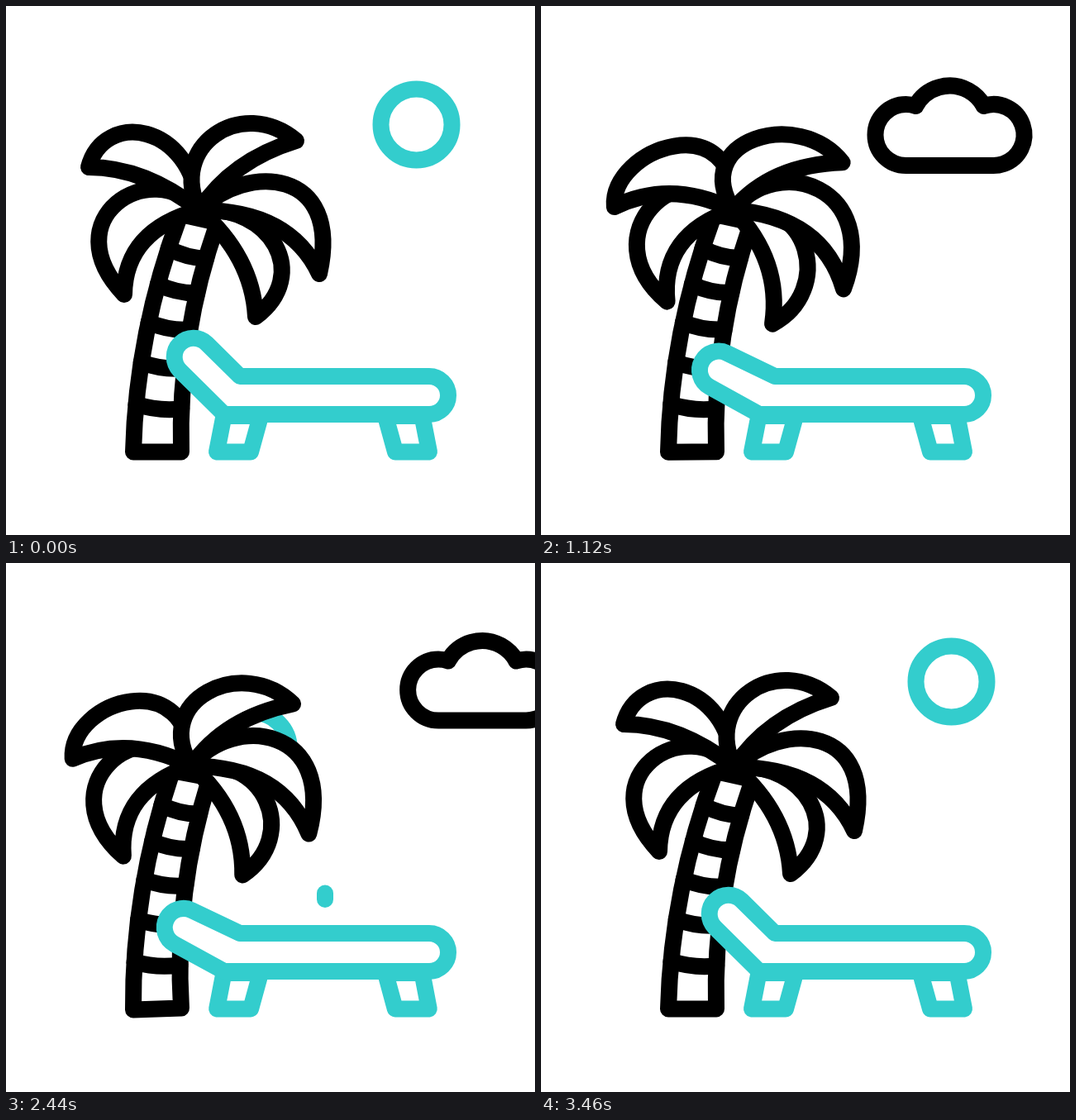
An HTML page with a canvas that plays this animation: 640 by 640 pixels, repeating every 3600 ms.

```html
<!DOCTYPE html>
<html lang="en">
<head>
<meta charset="utf-8">
<title>Beach</title>
<style>
html, body { margin: 0; width: 100%; height: 100%; overflow: hidden; background: #fff; }
canvas { display: block; }
</style>
</head>
<body>
<canvas id="stage" width="640" height="640"></canvas>
<script>
const ctx = document.getElementById('stage').getContext('2d');
const LOOP = 3600, INK = '#000', TEAL = '#33cdcd', DEG = Math.PI / 180;

const mix = (a, b, k) => a + (b - a) * k;
const smooth = k => k * k * (3 - 2 * k);
const ease = (t, from, to) => smooth(Math.min(1, Math.max(0, (t - from) / (to - from))));

// Eased value of a list of [time, value] keys.
function track(t, keys) {
  let value = keys[0][1];
  for (let i = 1; i < keys.length; i++)
    value += (keys[i][1] - keys[i - 1][1]) * ease(t, keys[i - 1][0], keys[i][0]);
  return value;
}

const sway = t => track(t, [[160, 0], [560, 4.4], [1340, -1.4], [2090, 4.2], [2700, -5.8], [3160, 0.9], [3460, 0]]);
const droop = t => track(t, [[160, 0], [620, 1], [1430, 1.2], [2150, 1], [2900, -0.3], [3310, 0]]);

function paint(color, filled = true) {
  ctx.strokeStyle = color;
  ctx.fillStyle = '#fff';
  if (filled) ctx.fill();
  ctx.stroke();
}

function drawSun(t) {
  const rising = t > 2150;
  if (t > 1220 && !rising) return;
  const k = rising ? 1 - ease(t, 2030, 3310) : ease(t, 160, 1220);
  ctx.beginPath();
  ctx.arc(mix(496.5, 236.5, k), mix(143.5, rising ? 250 : 231.5, k), 43, 0, 7);
  paint(TEAL);
}

function drawCloud(t) {
  const offset = Math.max(0, 0.0075 * (1000 - t), 0.0071 * (t - 1830)) ** 3;
  if (offset > 249) return;
  ctx.save();
  ctx.translate(494.5 + offset, -0.03 * offset);
  ctx.beginPath();
  ctx.arc(-53, 156, 37, Math.PI / 2, Math.atan2(-35, 12));
  ctx.arc(0, 143.5, 47, Math.atan2(-22.5, -41), Math.atan2(-22.5, 41));
  ctx.arc(53, 156, 37, Math.atan2(-35, -12), Math.PI / 2);
  ctx.closePath();
  paint(INK);
  ctx.restore();
}

const CROWN = [234, 247], ROOT = [183, 540];
const TRUNK_LEFT = [[154, 539.5], [157.5, 395], [211, 252]];
const TRUNK_RIGHT = [[212, 539.5], [208, 399], [256, 262]];

// Back edge: crown, c1, c2, tip. Front edge: tip, inner, crown. Bend is the droop in degrees.
const LEAVES = [
  { c1: [175, 180], c2: [56, 258], tip: [143, 349], inner: [144, 271], bend: -5, lag: 0 },
  { c1: [320, 240], c2: [370, 325], tip: [302, 376], inner: [298, 303], bend: 8, lag: 0 },
  { c1: [290, 190], c2: [408, 195], tip: [379, 324], inner: [343, 247], bend: 7, lag: 0 },
  { c1: [225, 140], c2: [118, 126], tip: [100, 195], inner: [168, 195], bend: -18, lag: 150 },
  { c1: [195, 170], c2: [285, 108], tip: [351, 163], inner: [273, 187], bend: 11, lag: 0 }
];

function turn([x, y], degrees) {
  const dx = x - CROWN[0], dy = y - CROWN[1];
  const cos = Math.cos(degrees * DEG), sin = Math.sin(degrees * DEG);
  return [CROWN[0] + dx * cos - dy * sin, CROWN[1] + dx * sin + dy * cos];
}

function along([a, b, c], k) {
  return [0, 1].map(i => mix(mix(a[i], b[i], k), mix(b[i], c[i], k), k));
}

function drawTrunk() {
  const [a, b, c] = TRUNK_LEFT, [d, e, f] = TRUNK_RIGHT;
  ctx.beginPath();
  ctx.moveTo(...a);
  ctx.quadraticCurveTo(...b, ...c);
  ctx.lineTo(...f);
  ctx.quadraticCurveTo(...e, ...d);
  ctx.closePath();
  paint(INK);
  ctx.beginPath();
  for (let i = 0; i < 5; i++) {
    const k = 0.2 + 0.18 * i - 0.004 * i * i;
    const [x0, y0] = along(TRUNK_LEFT, k), [x1, y1] = along(TRUNK_RIGHT, k - 0.014);
    ctx.moveTo(x0, y0);
    ctx.quadraticCurveTo((x0 + x1) / 2, (y0 + y1) / 2 + 6, x1, y1);
  }
  paint(INK, false);
}

function drawLeaf({ c1, c2, tip, inner, bend, lag }, t) {
  const angle = bend * droop(t - lag);
  const outer = turn(c2, angle);
  // The shoulder arches against the droop of the outer half.
  const shoulder = c1.map((v, i) => v - (outer[i] - c2[i]) / 2);
  ctx.beginPath();
  ctx.moveTo(...CROWN);
  ctx.bezierCurveTo(...shoulder, ...outer, ...turn(tip, angle));
  ctx.quadraticCurveTo(...turn(inner, angle * 0.6), ...CROWN);
  ctx.closePath();
  paint(INK);
}

function drawPalm(t) {
  ctx.save();
  ctx.translate(...ROOT);
  ctx.rotate(sway(t) * DEG);
  ctx.translate(-ROOT[0], -ROOT[1]);
  drawTrunk();
  LEAVES.forEach(leaf => drawLeaf(leaf, t));
  ctx.restore();
}

// Angle on a circle where the tangent from (x, y) touches it.
function touch(cx, cy, r, x, y, side) {
  return Math.atan2(y - cy, x - cx) + side * Math.acos(r / Math.hypot(x - cx, y - cy));
}

function drawLeg(outerTop, outerFoot, innerFoot, innerTop, foot) {
  ctx.beginPath();
  ctx.moveTo(outerTop, 496);
  ctx.lineTo(outerFoot, foot);
  ctx.lineTo(innerFoot, foot);
  ctx.lineTo(innerTop, 496);
  ctx.closePath();
  paint(TEAL);
}

function drawLounger(t) {
  const bend = track(t, [[2400, 0], [2880, 1], [3320, 0]]);
  const foot = 539.5 - 4 * bend;
  drawLeg(263.5, 255 + 7 * bend, 296 + 5 * bend, 308, foot);
  drawLeg(503.5 - bend, 512 - 11 * bend, 471 - 10 * bend, 459, foot);

  const tilt = track(t, [[400, 45], [1280, 26], [2380, 26], [2870, 57.3], [3340, 45]]);
  const reach = 65.5 - 0.38 * Math.max(0, tilt - 45);
  const x = 273 - reach * Math.cos(tilt * DEG), y = 471 - reach * Math.sin(tilt * DEG);
  ctx.beginPath();
  ctx.moveTo(283, 448);
  ctx.quadraticCurveTo(398, 448 - 4 * bend, 512, 448);
  ctx.arc(512, 471, 23, -Math.PI / 2, Math.PI / 2);
  ctx.quadraticCurveTo(388, 494 - 4 * bend, 264, 494);
  ctx.arc(x, y, 23, touch(x, y, 23, 264, 494, 1), touch(x, y, 23, 283, 448, -1));
  ctx.closePath();
  paint(TEAL);
}

function drawDash(t) {
  if (t < 2420 || t > 2700) return;
  ctx.beginPath();
  ctx.moveTo(386, 407 - 45 * ease(t, 2520, 2700));
  ctx.lineTo(386, 406.9 - 45 * ease(t, 2400, 2560));
  paint(TEAL, false);
}

function draw(t) {
  ctx.fillStyle = '#fff';
  ctx.fillRect(0, 0, 640, 640);
  ctx.lineWidth = 20;
  ctx.lineJoin = ctx.lineCap = 'round';
  drawSun(t);
  drawCloud(t);
  drawPalm(t);
  drawDash(t);
  drawLounger(t);
}

const start = performance.now();
function tick() {
  draw((performance.now() - start) % LOOP);
  requestAnimationFrame(tick);
}
tick();
</script>
</body>
</html>
```
